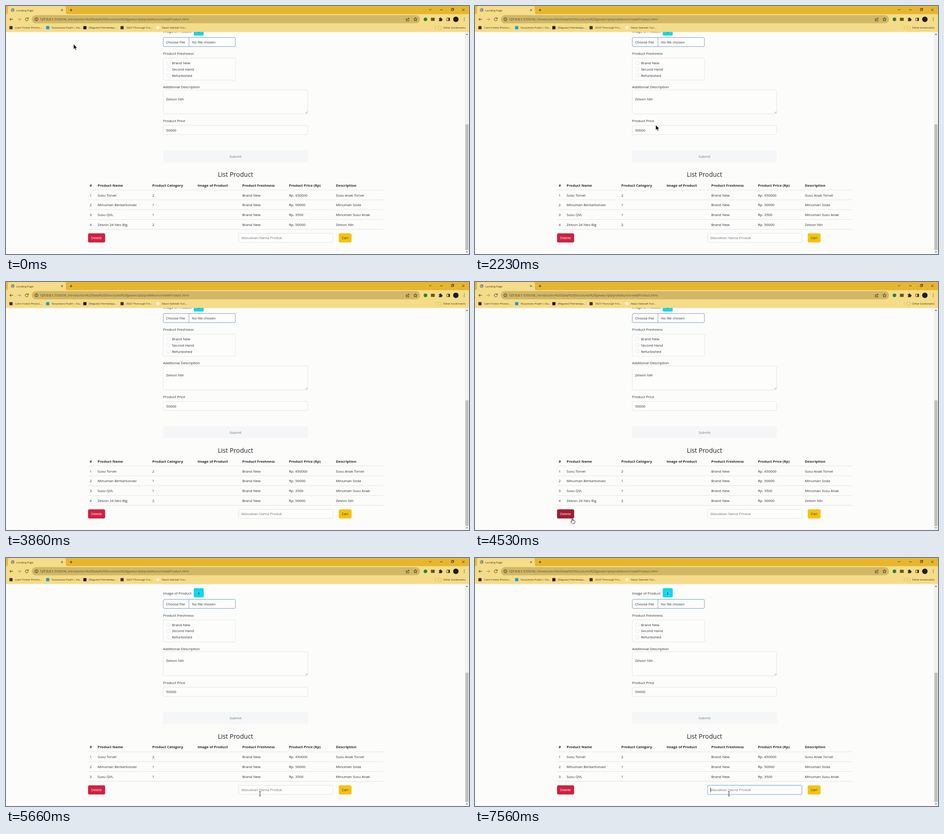
Write an HTML page that moves like this. It is 1021 px wide and 549 px high and loops after 8000 ms.

```html
<!DOCTYPE html>
<html lang="en">
<head>
<meta charset="utf-8">
<title>Landing Page</title>
<style>
html, body { margin: 0; width: 100%; height: 100%; overflow: hidden; background: #fcfcfa; }
svg { display: block; width: 1021px; height: 549px; }
text { font: 7.85px "Open Sans", "Noto Sans", sans-serif; fill: #2b3035; white-space: pre; }
.bold { font-weight: 700; fill: #212529; }
.title { font-size: 14.2px; font-weight: 500; fill: #212529; }
.small { font-size: 6px; fill: #3b3419; }
.url { font-size: 7px; fill: #5d5230; }
.mid { text-anchor: middle; }
.muted { fill: #6f767c; }
.white { fill: #fff; }
.box { fill: #fdfdfc; stroke: #dce0e4; stroke-width: .8; }
.icon { fill: none; stroke: #3d3416; stroke-width: 1; }
</style>
</head>
<body>
<svg viewBox="0 0 1021 549">
  <g id="page"></g>
  <g id="footer"></g>
  <g id="chrome"></g>
  <g id="arrow"><path d="M0 0V11.2L2.6 8.8 4.3 12.9 6.2 12.1 4.5 8.2H8Z" fill="#000" stroke="#fff" stroke-width=".6"/></g>
  <g id="hand"><path d="M-1 1Q0-.6 1 1V4.6Q2-.2 2.8 4.8 3.8 3.4 4.4 5.2 5.6 4.2 6 5.8V8.2L5 11.4H0L-3 7.4Q-3.6 5.6-1 6.8Z" fill="#fff" stroke="#111" stroke-width=".9"/></g>
  <g id="beam"><path d="M-2-5H-.6L0-4.4.6-5H2M0-4.4V4.4M-2 5H-.6L0 4.4.6 5H2" fill="none" stroke="#111" stroke-width=".9"/></g>
</svg>
<script>
const LOOP = 8000;
const el = id => document.getElementById(id);

// y is the vertical middle of the line
const text = (x, y, s, cls = "") => `<text x="${x}" y="${y + 2.9}" class="${cls}">${s}</text>`;
const rect = (x, y, w, h, r = 0, attrs = 'class="box"') =>
  `<rect x="${x}" y="${y}" width="${w}" height="${h}" rx="${r}" ${attrs}/>`;
const fill = c => `fill="${c}"`;
const path = (d, attrs = 'class="icon"') => `<path d="${d}" ${attrs}/>`;
const circle = (x, y, r, attrs) => `<circle cx="${x}" cy="${y}" r="${r}" ${attrs}/>`;

const columns = [184.5, 202, 322.5, 422.5, 521, 624, 727.5];
const row = (cells, y, cls) =>
  cells.map((s, i) => text(columns[i], y, s, cls)).join("") +
  path(`M181 ${y + 10.4}H832`, 'stroke="#dfe2e6" stroke-width=".9"');

const products = [
  ["Susu Torvel", 2, 450000, "Susu Anak Torvel"],
  ["Minuman Berkarbonasi", 1, 50000, "Minuman Soda"],
  ["Susu QVL", 1, 3500, "Minuman Susu Anak"],
  ["Zelvon 24 Neo Big", 2, 50000, "Zelvon Nih"]
];

function buildPage() {
  const radios = ["Brand New", "Second Hand", "Refurbished"].map((s, i) => {
    const y = 126 + i * 13.8;
    return circle(358, y, 4, 'class="box"') + text(366, y, s);
  }).join("");
  const rows = products.map(([name, category, price, note], i) =>
    `<g id="row${i}">${row([i + 1, name, category, "", "Brand New", "Rp. " + price, note], 418.6 + i * 21.8)}</g>`
  ).join("");

  el("page").innerHTML =
    rect(346.8, 16, 105, 20, 2) +
    text(346.5, 56.5, "Image of Product") +
    rect(414, 45, 22, 20.4, 3, fill("#17d5ea")) + text(425, 56.3, "i", "mid bold") +
    rect(346.9, 69.8, 159, 20, 2.5, 'fill="#fdfdfc" stroke="#638eb8" stroke-width=".9"') +
    path("M403.5 70V90", 'stroke="#638eb8" stroke-width=".8"') +
    text(353, 80, "Choose File") + text(410, 80, "No file chosen") +
    text(346.5, 105, "Product Freshness") +
    rect(346.8, 115.4, 159.2, 48.6, 2.5) + radios +
    text(346.5, 179.5, "Additional Description") +
    rect(346.8, 185.8, 318.6, 53, 2.5) + text(353, 205.6, "Zelvon Nih") +
    path("M660.5 237.5L664.5 233.5M663 237.5L664.5 236", 'stroke="#666" stroke-width=".7"') +
    text(346.5, 254, "Product Price") +
    rect(346.8, 264.4, 318.6, 20.2, 2.5) + text(353, 274.6, "50000") +
    rect(346.5, 319, 319, 27.3, 2.5, fill("#f5f6f7")) + text(506, 332.8, "Submit", "mid muted") +
    text(506, 375.2, "List Product", "mid title") +
    row(["#", "Product Name", "Product Category", "Image of Product", "Product Freshness",
      "Product Price (Rp)", "Description"], 396.8, "bold") +
    rows;
}

function buildFooter() {
  el("footer").innerHTML =
    rect(181, 503.2, 37.6, 20.2, 3, 'id="delete"') + text(199.6, 513.4, "Delete", "mid white") +
    rect(512, 502, 210, 22.6, 4, 'id="glow" fill="#c3dbfb"') +
    rect(513, 503.4, 207.8, 19.8, 2.5, 'id="search" fill="#fdfdfc" stroke-width=".9"') +
    text(519, 513.4, "Masukkan Nama Produk", "muted") +
    path("M519.6 508.5V518.5", 'id="caret" stroke="#111" stroke-width=".9"') +
    rect(733.8, 503.2, 28.2, 20.2, 3, fill("#f5c20f")) + text(747.8, 513.4, "Cari", "mid") +
    rect(1012, 57, 9, 492, 0, fill("#f1f1f0")) +
    rect(1013, 262, 7, 278, 0, 'id="thumb" fill="#c0c0c0"') +
    path("M1014.5 64L1016.5 61 1018.5 64Z", fill("#555")) +
    path("M1014.5 543L1016.5 546 1018.5 543Z", fill("#777"));
}

function buildChrome() {
  const bookmarks = [
    [20, "Calm Forest Photos...", "#333"], [101, "Nusantara Psalm | Ka...", "#1a9bd0"],
    [183, "[Reguler] Pembelaja...", "#111"], [265, "2023 Thorough Fro...", "#333"],
    [344, "React Sekolah Tun...", "#fbf3d0"]
  ].map(([x, s, c]) => rect(x - 12.5, 44.5, 7, 7, 1, fill(c)) + text(x, 47.4, s, "small")).join("");
  const dots = [26.5, 29.5, 32.5].map(y => circle(1010.5, y, .8, fill("#3d3416"))).join("");

  el("chrome").innerHTML =
    rect(0, 0, 1021, 18, 0, fill("#e6b62f")) +
    rect(0, 18, 1021, 39.5, 0, fill("#f4dc88")) +
    path("M0 18Q4 18 4 14V4Q4 0 8 0H128Q132 0 132 4V14Q132 18 136 18Z", fill("#f4dc88")) +
    circle(14.7, 9, 4, fill("#8b8b83")) + path("M11.5 8Q14 7 14 9.5T17 11", 'fill="none" stroke="#e9e0bd"') +
    text(23, 8.6, "Landing Page", "small") +
    path("M121.5 7L125.5 11M125.5 7L121.5 11M140.5 9H146.5M143.5 6V12") +
    path("M933 7L935.5 9.5 938 7M957.5 8.5H962.5M982 6.3H986V10.3H982ZM983.5 6V5H987.3V9H986M1006 6L1011 11M1011 6L1006 11", 'class="icon" stroke-width=".8"') +
    path("M15.5 29.5H8.5M11.5 26.3L8.3 29.5 11.5 32.7") +
    path("M25.5 29.5H32.5M29.5 26.3L32.7 29.5 29.5 32.7", 'class="icon" opacity=".45"') +
    path("M48.4 27.2A3.4 3.4 0 1 0 49.2 30.3M49.3 25.5V28.3H46.4") +
    rect(57, 20.3, 856, 18, 9, fill("#d1b767")) +
    circle(67, 29.4, 3.4, 'class="icon" stroke-width=".8"') + path("M67 29V31.3M67 27.2V28") +
    `<text x="75" y="32" class="url"><tspan fill="#2f2810">127.0.0.1</tspan>:5500/08_Introduction%20Data%20Structures%20(javascript)/praktikum/createProduct.html</text>` +
    path("M884.5 28H882.7V33H888.5V31M884.5 31Q885 27.7 888.5 27.7M887 25.7L889.2 27.7 887 29.7", 'class="icon" stroke-width=".8"') +
    path("M903 25.5L904.1 28.1 907 28.4 904.8 30.3 905.5 33.1 903 31.6 900.5 33.1 901.2 30.3 899 28.4 901.9 28.1Z", 'class="icon" stroke-width=".8"') +
    circle(925, 29.5, 4, fill("#25863a")) +
    rect(937, 26, 8.5, 7, 1, fill("#6f5a12")) +
    path("M954.5 27H956.7Q956.7 25 958 25T959.3 27H961.2V29Q963 29 963 30.3T961.2 31.6V33.4H954.5V31.6Q956 31.4 956 30.3T954.5 29Z", fill("#2f2810")) +
    rect(972, 26.5, 6.5, 6.2, .5, 'class="icon"') + rect(975.5, 26.5, 3, 6.2, 0, fill("#2f2810")) +
    circle(992, 29.5, 6, fill("#1b1d20")) + dots + bookmarks +
    path("M946.5 43V52", 'stroke="#d5b964"') +
    path("M952.5 44.7H955.2L956.2 45.8H959.5V51H952.5Z", 'fill="#f8e08b" stroke="#d2ac3a" stroke-width=".7"') +
    text(964, 47.4, "Other bookmarks", "small");
}

const clamp = v => Math.max(0, Math.min(1, v));
const progress = (t, from, to) => clamp((t - from) / (to - from));
const smooth = v => v * v * (3 - 2 * v);
const mix = (a, b, k) => `rgb(${a.map((v, i) => Math.round(v + (b[i] - v) * k))})`;

// [start, end, x0, y0, x1, y1]; the pointer rests at the end of a move
const moves = [
  [0, 30, 149, 84.5, 149, 84.5],
  [30, 300, 149, 84.5, 349.5, 231.5],
  [2230, 2530, 398.5, 263.5, 470, 350],
  [4330, 4450, 228, 527, 214.5, 523.5],
  [5360, 5660, 214.5, 523.5, 560, 522]
];

function pointer(t) {
  const [from, to, x0, y0, x1, y1] = moves.findLast(m => t >= m[0]);
  const k = smooth(progress(t, from, to));
  return [x0 + (x1 - x0) * k, y0 + (y1 - y0) * k];
}

function render(t) {
  const removed = t >= 4890;
  el("page").setAttribute("transform", `translate(0 ${removed ? 21.8 : 0})`);
  el("row3").style.display = removed ? "none" : "";
  el("thumb").setAttribute("y", removed ? 254 : 262);
  el("thumb").setAttribute("height", removed ? 286 : 278);

  const hover = progress(t, 4380, 4530) - progress(t, 5390, 5540);
  el("delete").setAttribute("fill", mix([206, 33, 65], [160, 28, 49], hover));

  const focus = progress(t, 6230, 6400);
  el("glow").setAttribute("opacity", focus);
  el("search").setAttribute("stroke", mix([220, 224, 228], [128, 176, 240], focus));
  const caretOn = t >= 6230 && !(t >= 6930 && t < 7460);
  el("caret").style.display = caretOn ? "" : "none";

  const [x, y] = pointer(t);
  const hidden = t >= 2530 && t < 4330;
  const shape = hidden ? "" : t >= 5360 && x > 513 ? "beam" : t >= 4380 && x < 218.6 ? "hand" : "arrow";
  for (const id of ["arrow", "hand", "beam"]) {
    el(id).style.display = id === shape ? "" : "none";
    el(id).setAttribute("transform", `translate(${x} ${y})`);
  }
}

function tick() {
  render(performance.now() % LOOP);
  requestAnimationFrame(tick);
}

buildPage();
buildFooter();
buildChrome();
tick();
</script>
</body>
</html>
```
